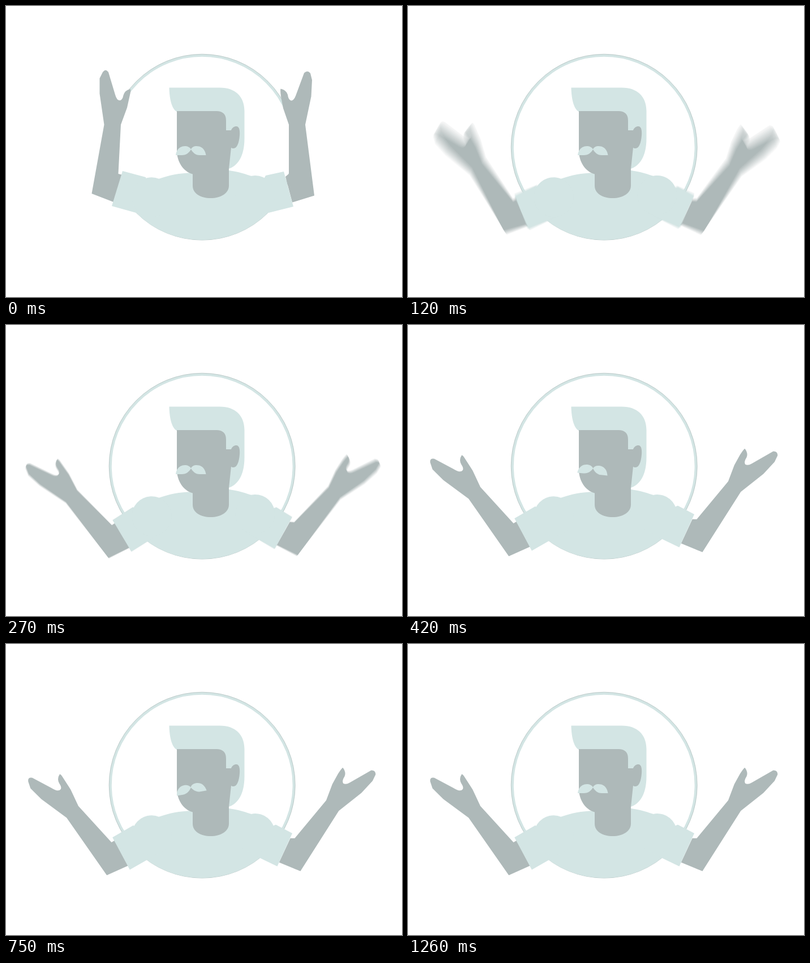
An HTML page that plays this animation: 700 by 515 pixels, repeating every 1800 ms.

```html
<!DOCTYPE html>
<html lang="en">
<head>
<meta charset="utf-8">
<title>Shrug</title>
<style>
html, body { margin: 0; width: 100%; height: 100%; overflow: hidden; background: #fff; }
svg { display: block; width: 700px; height: 515px; }
.light { fill: #d3e5e4; }
.skin { fill: #aeb9b9; }
</style>
</head>
<body>
<svg id="stage" viewBox="0 0 700 515" xmlns="http://www.w3.org/2000/svg">
  <defs>
    <g id="back">
      <rect width="700" height="515" fill="#fff"/>
      <circle cx="346.7" cy="249.7" r="162.2" fill="none" stroke="#d3e5e4" stroke-width="4.6"/>
      <circle cx="346.7" cy="249.7" r="164.5" fill="none" stroke="#9fb0af" stroke-width=".6"/>
      <path class="light" d="M230 366L257 330L268 306.5C290 299 305 296 330 295L394 291C410 293 425 298 437 302L441 330L463 366A164.7 164.7 0 0 1 230 366Z"/>
    </g>
    <g id="left">
      <path class="skin" d="M165.5 128L171 117Q176 110 181 117L193 157Q196 168 202 167Q206 166 207.5 158Q210 149 219.5 147Q221 148 220 153L214 180L203 210L198.5 297L210 300L195 349L189 346.5L151.5 332L173.5 210L165.5 155Z"/>
      <path class="light" d="M206 292L247 303L257.5 338.5L246 370.5L187 354Z"/>
      <circle class="light" cx="257.5" cy="338.5" r="35.2"/>
    </g>
    <g id="right">
      <path class="skin" d="M541 131L538 119Q533 113 527 118.5L512 159Q509 167 504 167.5Q499 166 498 157Q496 149 485.5 146.5Q484.5 149 486 160L490 181L500 210L500 297L494 302L506 347.5L545 335.5L529 210L539.5 160Z"/>
      <path class="light" d="M491 293L459 300L440.5 334.8L450 369.5L508 355Z"/>
      <circle class="light" cx="440.5" cy="334.8" r="34.8"/>
    </g>
  </defs>
  <g id="layers"></g>
  <path class="light" d="M288.5 144.5H378C405 144.5 421.5 160 421.5 186V235C421.5 262 412 282 394 288L380 187H302C294 183 289 167 288.5 144.5Z"/>
  <path class="skin" d="M302 186H372Q389 186 389 203V220H398C400 214.5 404 212.5 408 213C413 214 413.6 222 413 229C412 243 408 252 402 252Q399 252 398 250.5L394 288V318C394 332 379 340 362 340C344 340 330 332 330 318V297.5C313 293 302 275 302 256Z"/>
  <path id="stache" class="light" d="M300 264C301 254 308 248 316 248C321 248 325 250 327 253.5C328.5 250 332 248 337 248C347 248 352 255 353.5 264H342C335 264 330 259 327 254C324 259 319 264 311 264Z"/>
</svg>
<script>
const LOOP = 1800, STEP = 30, SHUTTER = 15, SAMPLES = 14;
const leftKeys = [[0, 0], [180, -52.5], [330, -45.2]];
const rightKeys = [[0, 0], [180, 52.5], [330, 39.7]];
const stacheKeys = [[320, 0], [510, 10], [750, -10], [960, 0]];
const $ = id => document.getElementById(id);

function make(tag, attrs, parent) {
  const el = document.createElementNS("http://www.w3.org/2000/svg", tag);
  for (const name in attrs) el.setAttribute(name, attrs[name]);
  return parent.appendChild(el);
}

// Eased value between [time, value] keys.
function tween(keys, t) {
  if (t <= keys[0][0]) return keys[0][1];
  for (let i = 1; i < keys.length; i++) {
    const [t0, a] = keys[i - 1], [t1, b] = keys[i];
    if (t < t1) return a + (b - a) * (1 - Math.cos(Math.PI * (t - t0) / (t1 - t0))) / 2;
  }
  return keys[keys.length - 1][1];
}

// Opacity 1/k per layer makes the stack an even average: motion blur.
const layers = Array.from({ length: SAMPLES }, (_, i) => {
  const g = make("g", { opacity: 1 / (i + 1) }, $("layers"));
  make("use", { href: "#back" }, g);
  return {
    g,
    left: make("use", { href: "#left" }, g),
    right: make("use", { href: "#right" }, g)
  };
});

function turn(el, angle, x, y) {
  el.setAttribute("transform", `rotate(${angle.toFixed(3)} ${x} ${y})`);
}

function draw(t) {
  const moving = t > 0 && t < 330 && t !== 180;
  layers.forEach((layer, i) => {
    layer.g.style.display = i && !moving ? "none" : "";
    const at = moving ? t + SHUTTER * (i / (SAMPLES - 1) - 0.5) : t;
    turn(layer.left, tween(leftKeys, at), 257.5, 338.5);
    turn(layer.right, tween(rightKeys, at), 440.5, 334.8);
  });
  turn($("stache"), tween(stacheKeys, t), 327, 255);
}

let start, shown = -1;
function tick(now) {
  if (start === undefined) start = now;
  const t = Math.floor((now - start) % LOOP / STEP) * STEP;
  if (t !== shown) draw(shown = t);
  requestAnimationFrame(tick);
}
draw(0);
requestAnimationFrame(tick);
</script>
</body>
</html>
```
